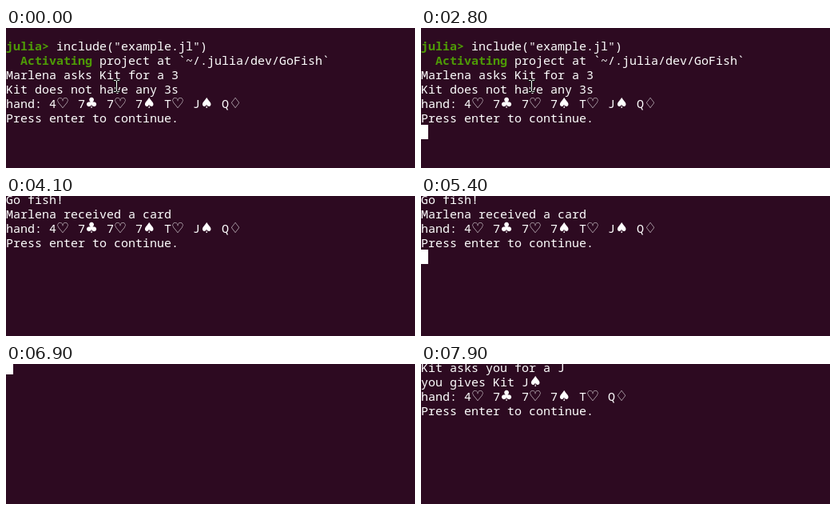
Animation of 512 by 175 pixels, one loop 8 s. Source, as an HTML page:

```html
<!DOCTYPE html>
<html lang="en">
<head>
<meta charset="utf-8">
<style>
  html, body { margin: 0; width: 100%; height: 100%; overflow: hidden; background: #2d0a21; }
  svg { display: block; width: 512px; height: 175px; }
  text { font: 15px "Noto Sans Mono", "DejaVu Sans Mono", monospace; fill: #fff; white-space: pre; }
  .green { fill: #4e9a06; font-weight: bold; }
  .suit { font: 18px "DejaVu Sans", sans-serif; }
</style>
</head>
<body>
<svg viewBox="0 0 512 175">
  <g id="screen"></g>
  <rect id="caret" width="9" height="18" fill="#fff"/>
  <g id="pointer" fill="none" stroke-linecap="square">
    <path d="M135.5 65.5h2l1 1 1-1h2M138.5 66.5v12M135.5 79.5h2l1-1 1 1h2" stroke="#111" stroke-width="3"/>
    <path d="M135.5 65.5h2l1 1 1-1h2M138.5 66.5v12M135.5 79.5h2l1-1 1 1h2" stroke="#fff"/>
  </g>
</svg>
<script>
const CELL = 9, ROW = 18, TOP = -5, BASE = 15, LOOP = 8000;
const $ = id => document.getElementById(id);

const prompt = 'Press enter to continue.';
const hand = 'hand: 4♡  7♣  7♡  7♠  T♡  ';

// Text between asterisks is bold green.
const scenes = [
  { at: 0, pointer: true, lines: ['', '*julia>* include("example.jl")',
    '*  Activating* project at `~/.julia/dev/GoFish`',
    'Marlena asks Kit for a 3', 'Kit does not have any 3s', hand + 'J♠  Q♢', prompt] },
  { at: 3100, lines: ['Go fish!'] },
  { at: 4100, lines: ['Go fish!', 'Marlena received a card', hand + 'J♠  Q♢', prompt] },
  { at: 6900, lines: [] },
  { at: 7900, lines: ['Kit asks you for a J', 'you gives Kit J♠', hand + 'Q♢', prompt] }
];

// Spans of time in which the caret is lit.
const lit = [[500, 1000], [1600, 2200], [2800, 3600], [4200, 4800],
  [5400, 6000], [6600, 7600]];

function addText(str, col, row, cls) {
  const el = document.createElementNS('http://www.w3.org/2000/svg', 'text');
  el.setAttribute('x', col * CELL);
  el.setAttribute('y', TOP + row * ROW + BASE);
  el.setAttribute('class', cls);
  el.textContent = str;
  $('screen').append(el);
}

function drawLine(line, row) {
  let col = 0;
  line.split('*').forEach((part, i) => {
    for (const run of part.match(/[♡♣♠♢]|[^♡♣♠♢]+/g) || []) {
      addText(run, col, row, /[♡♣♠♢]/.test(run) ? 'suit' : i % 2 ? 'green' : '');
      col += run.length;
    }
  });
}

let shown;
function show(scene) {
  shown = scene;
  $('screen').replaceChildren();
  scene.lines.forEach(drawLine);
  $('caret').setAttribute('y', TOP + scene.lines.length * ROW);
  $('pointer').style.display = scene.pointer ? '' : 'none';
}

function frame() {
  const t = performance.now() % LOOP;
  const scene = scenes.filter(s => s.at <= t).pop();
  if (scene !== shown) show(scene);
  $('caret').style.display = lit.some(([on, off]) => t >= on && t < off) ? '' : 'none';
  requestAnimationFrame(frame);
}
frame();
</script>
</body>
</html>
```
